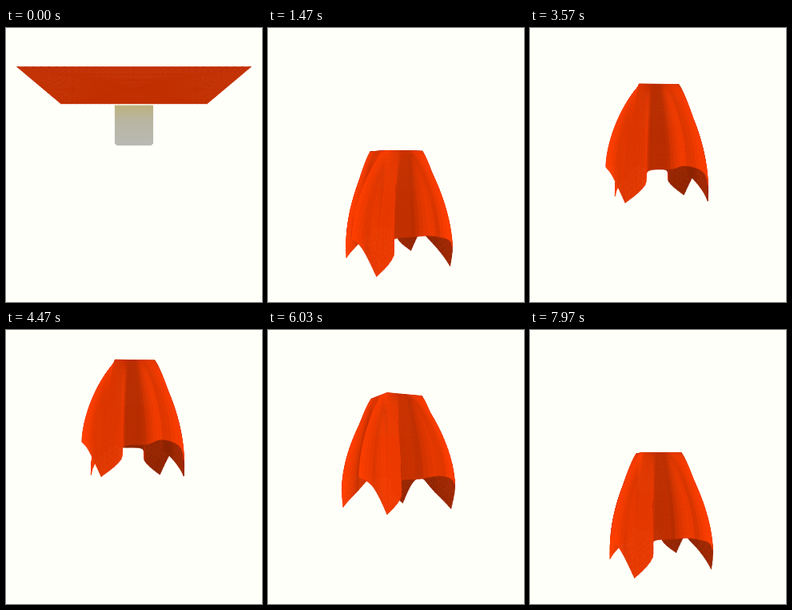
An HTML page with a canvas that plays this animation: 320x343 px, repeating every 8000 ms.

```html
<!DOCTYPE html>
<html lang="en">
<head>
<meta charset="utf-8">
<title>Draped cloth</title>
<style>
  html, body { margin: 0; width: 100%; height: 100%; overflow: hidden; background: #fffffa; }
  canvas { display: block; width: 100vw; height: 100vh; }
</style>
</head>
<body>
<canvas id="stage"></canvas>
<script>
const W = 320, H = 343, LOOP = 8000;
const EYE = { x: 160, y: 171.5, dist: 487 };
const HALF = 112.5;        // half the side of the cloth
const BOX = 22.5;          // half the side of the box
const INNER = 0.21;        // share of the cloth resting on the box
const SIDE = 30, RINGS = 20, FLAT_RINGS = 3;
const RAD = Math.PI / 180;

// Hem along one side, corner to corner: angle, radius, drop below the box top.
const HEM = [
  [0, 68, 138], [15, 50, 119], [14, 36, 103], [55, 38, 101],
  [60, 67, 97], [78, 74, 107], [90, 68, 138]
];

const canvas = document.getElementById("stage");
const ctx = canvas.getContext("2d");
const ratio = Math.max(1, window.devicePixelRatio || 1);
canvas.width = W * ratio;
canvas.height = H * ratio;

const clamp = (v, lo = 0, hi = 1) => Math.min(hi, Math.max(lo, v));
const lerp = (a, b, k) => a + (b - a) * k;
const smooth = v => { v = clamp(v); return v * v * (3 - 2 * v); };

function turn(x, z, deg) {
  const c = Math.cos(deg * RAD), s = Math.sin(deg * RAD);
  return [x * c + z * s, z * c - x * s];
}

function project([x, y, z]) {
  const k = EYE.dist / (EYE.dist - z);
  return [EYE.x + x * k, EYE.y - y * k];
}

function catmull(a, b, c, d, k) {
  return b + 0.5 * k * (c - a + k * (2 * a - 5 * b + 4 * c - d + k * (3 * (b - c) + d - a)));
}

function hemAt(s) {
  const last = HEM.length - 1;
  const i = Math.min(last - 1, Math.floor(s * last));
  const at = n => HEM[clamp(n, 0, last)];
  return [0, 1, 2].map(n =>
    catmull(at(i - 1)[n], at(i)[n], at(i + 1)[n], at(i + 2)[n], s * last - i));
}

// One entry per step around the cloth: its direction in the square and its hem.
const rim = [];
for (let i = 0; i < 4 * SIDE; i++) {
  const k = Math.floor(i / SIDE), s = i / SIDE - k;
  const [angle, radius, drop] = hemAt(s);
  rim.push({ dir: turn(2 * s - 1, 1, 90 * k), angle: angle - 45 + 90 * k, radius, drop });
}

const rings = [];
for (let j = 0; j <= FLAT_RINGS; j++) rings.push(INNER * j / FLAT_RINGS);
for (let j = 1; j <= RINGS; j++) rings.push(lerp(INNER, 1, j / RINGS));

function pose(t) {
  const spin = 100 * t;
  const lag = Math.min(spin, 42) * (1 - smooth((t - 0.87) / 0.5));
  return {
    spin,
    rot: spin - lag,
    top: 72.8 - 56.2 * Math.sin(t),
    free: 94.5 - 277 * t * t,
    trail: lerp(-6, 10, smooth((t - 1.5) / 2))
  };
}

function clothPoint(r, m, p) {
  const q = Math.max(0, (m - INNER) / (1 - INNER));
  let x = r.dir[0] * m * HALF, z = r.dir[1] * m * HALF;
  const drop = r.drop * Math.pow(q, 1.12);
  const y = Math.max(p.free, p.top - drop);
  const fall = p.top - p.free;
  if (q > 0 && fall > 0) {
    const out = 1 - Math.pow(1 - q, 1.65);
    const a = (r.angle + p.trail) * RAD;
    const dx = lerp(r.dir[0] * INNER * HALF, Math.sin(a) * r.radius, out);
    const dz = lerp(r.dir[1] * INNER * HALF, Math.cos(a) * r.radius, out);
    const k = smooth(fall / (1.5 * lerp(r.drop, drop, 0.6)));
    x = lerp(x, dx, k);
    z = lerp(z, dz, k);
  }
  const [rx, rz] = turn(x, z, -p.rot);
  return [rx, y, rz];
}

function area(pts) {
  return pts.reduce((sum, a, i) => {
    const b = pts[(i + 1) % pts.length];
    return sum + a[0] * b[1] - b[0] * a[1];
  }, 0);
}

function normal(a, b, c, d) {
  const u = [0, 1, 2].map(n => c[n] - a[n]);
  const v = [0, 1, 2].map(n => d[n] - b[n]);
  const w = [u[1] * v[2] - u[2] * v[1], u[2] * v[0] - u[0] * v[2], u[0] * v[1] - u[1] * v[0]];
  const len = Math.hypot(...w) || 1;
  return w.map(n => n / len);
}

function trace(pts) {
  ctx.beginPath();
  pts.forEach(([x, y]) => ctx.lineTo(x, y));
  ctx.closePath();
}

function clothQuads(p) {
  const grid = rings.map(m => rim.map(r => clothPoint(r, m, p)));
  const quads = [];
  for (let j = 0; j + 1 < rings.length; j++) {
    for (let i = 0; i < rim.length; i++) {
      const n = (i + 1) % rim.length;
      const corners = [grid[j][i], grid[j][n], grid[j + 1][n], grid[j + 1][i]];
      const pts = corners.map(project);
      const [nx, ny] = normal(...corners);
      const ridge = clamp((rim[i].radius - 36) / 36);
      const light = area(pts) > 0
        ? Math.min(1, 0.72 + 0.15 * ridge + 0.16 * Math.abs(nx))
        : 0.55 + 0.21 * Math.abs(ny) + 0.06 * Math.abs(nx);
      quads.push({ pts, light, z: corners.reduce((sum, c) => sum + c[2], 0) / 4 });
    }
  }
  return quads.sort((a, b) => a.z - b.z);
}

function drawQuad({ pts, light }) {
  const color = `rgb(${Math.round(255 * light)},${Math.round(63 * light)},0)`;
  trace(pts);
  ctx.fillStyle = ctx.strokeStyle = color;
  ctx.lineWidth = 0.7;
  ctx.fill();
  ctx.stroke();
}

function drawBox(p) {
  const hi = p.top - 1.8, lo = hi - 2 * BOX;
  const ends = [[-1, 1], [1, 1], [1, -1], [-1, -1]].map(([x, z]) => turn(x * BOX, z * BOX, -p.spin));
  const level = y => ends.map(([x, z]) => project([x, y, z]));
  const top = level(hi), base = level(lo);
  const from = Math.min(...top.map(c => c[1])), to = Math.max(...base.map(c => c[1]));
  const fill = ctx.createLinearGradient(0, from, 0, to);
  fill.addColorStop(0, "#bdb27c");
  fill.addColorStop(0.35, "#b8b5a0");
  fill.addColorStop(1, "#b9b9b4");
  ctx.fillStyle = ctx.strokeStyle = fill;
  ctx.lineWidth = 1;
  ctx.lineJoin = "round";
  const faces = ends.map((_, i) => {
    const n = (i + 1) % 4;
    return [top[i], top[n], base[n], base[i]];
  });
  if (lo > 0) faces.push(base);
  faces.forEach(face => {
    if (face !== base && area(face) <= 0) return;
    trace(face);
    ctx.fill();
    ctx.stroke();
  });
}

function draw(ms) {
  const p = pose((ms % LOOP) / 1000);
  const behind = q => q.z < -BOX * 0.7;
  ctx.setTransform(ratio, 0, 0, ratio, 0, 0);
  ctx.fillStyle = "#fffffa";
  ctx.fillRect(0, 0, W, H);
  ctx.lineJoin = "round";
  const quads = clothQuads(p);
  quads.filter(behind).forEach(drawQuad);
  drawBox(p);
  quads.filter(q => !behind(q)).forEach(drawQuad);
}

const start = performance.now();
function tick() {
  draw(performance.now() - start);
  requestAnimationFrame(tick);
}
tick();
</script>
</body>
</html>
```
